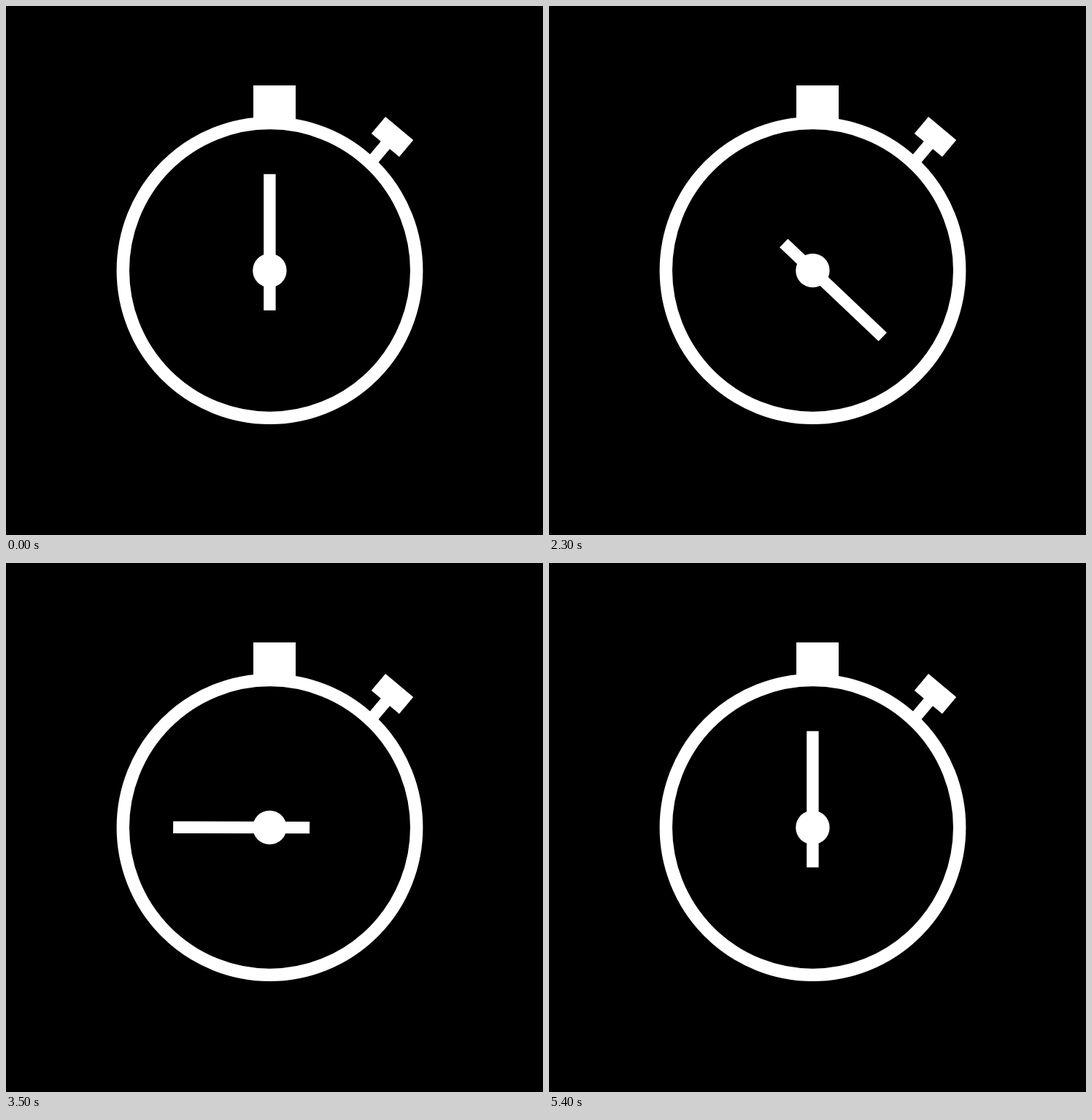
Animation, 736 px wide and 726 px high, one loop 6100 ms. Source, as an HTML page:

```html
<!DOCTYPE html>
<html lang="en">
<head>
<meta charset="utf-8">
<title>Stopwatch</title>
<style>
  html, body { margin: 0; width: 100%; height: 100%; overflow: hidden; background: #000; }
  svg { display: block; }
</style>
</head>
<body>
<svg width="736" height="726" viewBox="0 0 736 726" fill="#fff">
  <ellipse cx="361.5" cy="363" rx="201.2" ry="202.4" fill="none" stroke="#fff" stroke-width="17.4"/>
  <rect x="339" y="109" width="58" height="52"/>
  <g transform="translate(529.5 179.5) rotate(40)">
    <rect x="-8" y="0" width="16" height="48"/>
    <rect id="button" x="-24.9" y="-15" width="49.8" height="30"/>
  </g>
  <g transform="translate(361.4 363)">
    <rect id="hand" x="-8.2" y="-132.3" width="16.4" height="187"/>
    <circle r="23.2"/>
  </g>
</svg>
<script>
const LOOP = 6100, STEP = 100, PRESS = 12;
const hand = document.getElementById('hand');
const button = document.getElementById('button');

// Smooth 0 to 1 between times a and b
function ease(t, a, b) {
  const u = Math.min(1, Math.max(0, (t - a) / (b - a)));
  return u * u * (3 - 2 * u);
}

// Down and back up within 400 ms
const press = (t, a) => ease(t, a, a + 200) - ease(t, a + 200, a + 400);

function draw(now) {
  const t = Math.floor(now % LOOP / STEP) * STEP;
  const turn = 360 * ease(t, 400, 5000);
  const push = PRESS * (press(t, 0) + press(t, 5000));
  hand.setAttribute('transform', `rotate(${turn})`);
  button.setAttribute('transform', `translate(0 ${push})`);
}

const start = performance.now();
function tick() {
  draw(performance.now() - start);
  requestAnimationFrame(tick);
}
tick();
</script>
</body>
</html>
```
